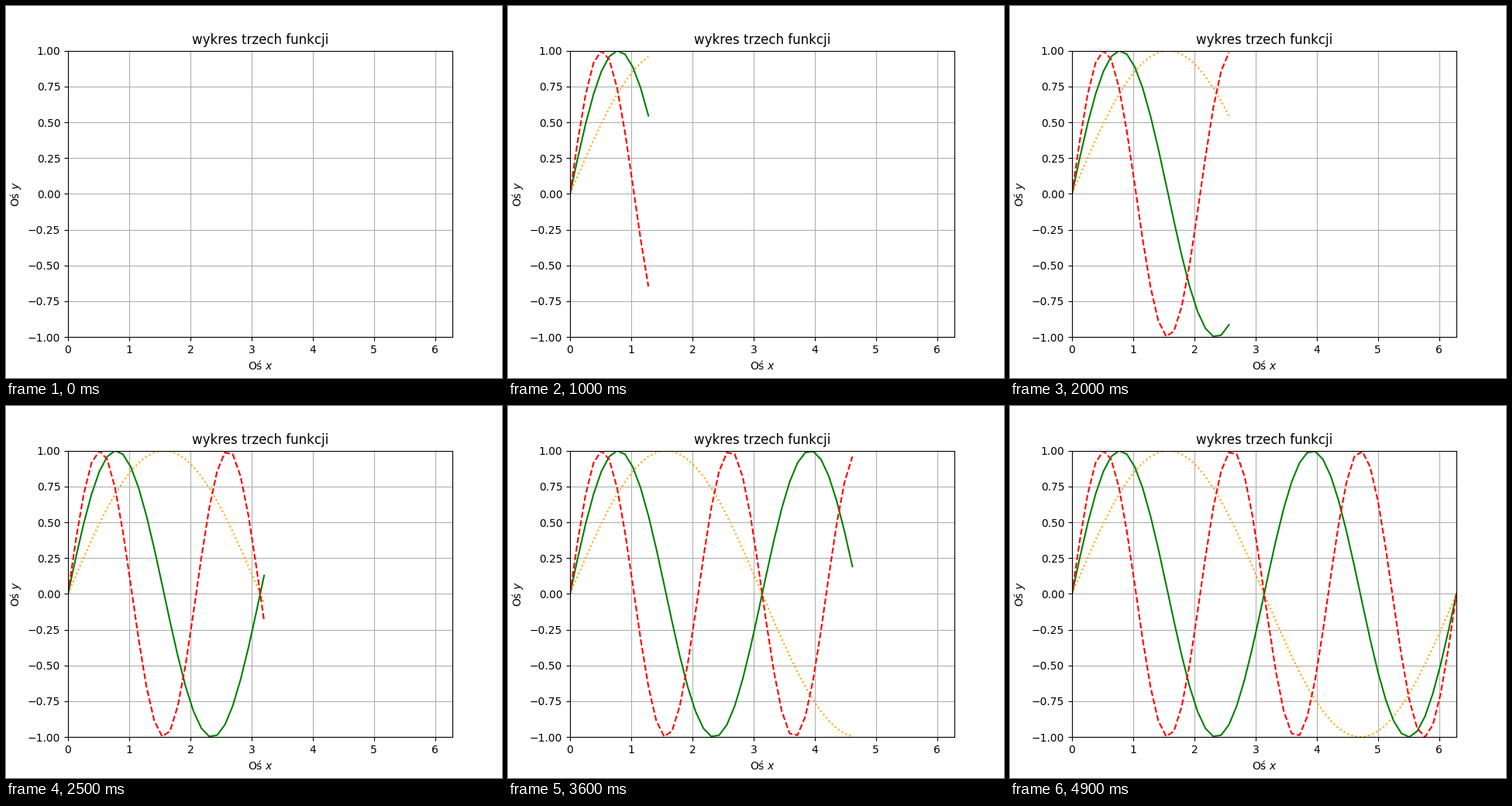
Animation, 640 px wide and 480 px high, one loop 10000 ms. Source, as a matplotlib script:

```python
import numpy as np
import matplotlib.pyplot as plt
from matplotlib.animation import FuncAnimation

POINTS = 50
FRAMES = 100
INTERVAL = 100

x = np.linspace(0, 2 * np.pi, POINTS)
styles = [(1, "orange", ":"), (2, "green", "-"), (3, "red", "--")]

fig, ax = plt.subplots(figsize=(6.4, 4.8), dpi=100)
ax.set_xlim(0, 2 * np.pi)
ax.set_ylim(-1, 1)
ax.set_title("wykres trzech funkcji")
ax.set_xlabel("Oś $x$")
ax.set_ylabel("Oś $y$")
ax.grid(True)

curves = [
    (ax.plot([], [], color=color, linestyle=style)[0], np.sin(k * x))
    for k, color, style in styles
]


def update(frame):
    # One more point per frame, then hold the finished curves.
    n = min(frame + 1, POINTS)
    for line, y in curves:
        line.set_data(x[:n], y[:n])
    return [line for line, _ in curves]


def init():
    return update(0)


anim = FuncAnimation(fig, update, frames=FRAMES, init_func=init,
                     interval=INTERVAL, repeat=True, repeat_delay=0, blit=False)

plt.show()
```
